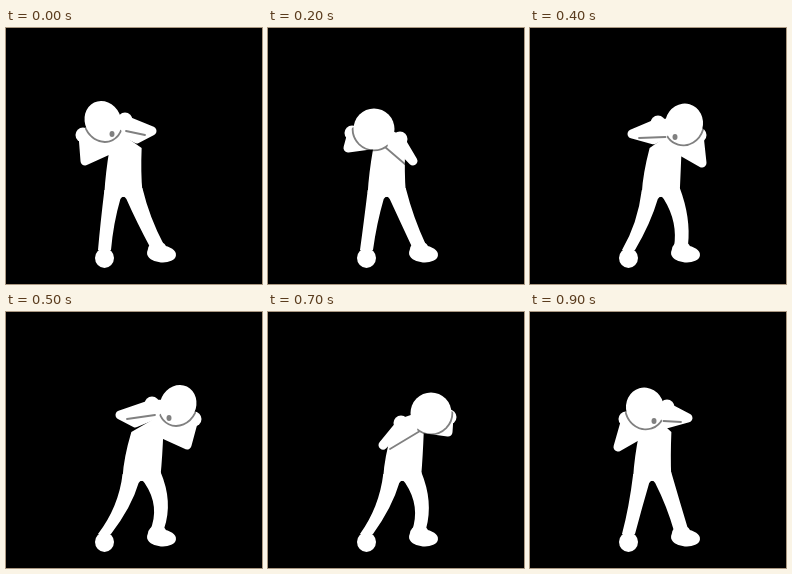
Recreate the animation shown at these times as an HTML page with a canvas. Size 256 by 256 pixels, loop 1000 ms.

```html
<!DOCTYPE html>
<html lang="en">
<head>
<meta charset="utf-8">
<title>Dancing figure</title>
<style>
  html, body { margin: 0; width: 100%; height: 100%; overflow: hidden; background: #000; }
  canvas { display: block; width: 100vw; height: 100vh; }
</style>
</head>
<body>
<canvas id="stage" width="256" height="256"></canvas>
<script>
const ctx = document.getElementById('stage').getContext('2d');
const STEP = 100;
const STEPS = 10;
const HALF = STEPS / 2;
const CENTRE = { head: 134.5, hand: 132.5, elbow: 130 };

const arm = (hand, elbow) => ({ hand, elbow });

// Key points of one half swing; the other half is its mirror image
const lean = { head: [97, 93], left: arm([77, 107], [79, 133]), right: arm([119, 92], [146, 103]) };
const duck = { head: [106, 101], left: arm([84, 105], [80, 120]), right: arm([132, 111], [145, 133]) };
const pass = { head: [120, 101], left: arm([96, 101], [84, 114]), right: arm([142, 113], [151, 137]) };
const rise = { head: [154, 96], left: arm([128, 95], [102, 106]), right: arm([169, 107], [172, 135]) };

function mid(a, b) {
  if (typeof a === 'number') return (a + b) / 2;
  if (Array.isArray(a)) return a.map((v, i) => mid(v, b[i]));
  return Object.fromEntries(Object.keys(a).map(k => [k, mid(a[k], b[k])]));
}

const swing = [lean, mid(lean, duck), duck, pass, rise];

const flip = ([x, y], axis) => [2 * axis - x, y];
const flipArm = a => arm(flip(a.hand, CENTRE.hand), flip(a.elbow, CENTRE.elbow));
const mirror = p => ({
  head: flip(p.head, CENTRE.head), left: flipArm(p.right), right: flipArm(p.left)
});

function poseAt(step) {
  const key = swing[step % HALF];
  const p = step < HALF ? key : mirror(key);
  const sway = -Math.cos((step / STEPS) * 2 * Math.PI - 0.52);
  const dir = p.head[0] < CENTRE.head ? 1 : -1; // side of the front arm
  const lift = (101 - p.head[1]) / 8;           // 0: face down, 1: head up
  return { ...p, dir, lift, chest: 129.5 + 12.5 * sway, hip: 126.5 + 10.5 * sway };
}

function oval(x, y, rx, ry, turn = 0, from = 0, to = 2 * Math.PI) {
  ctx.beginPath();
  ctx.ellipse(x, y, rx, ry, turn, from, to);
}

function blob(...shape) {
  oval(...shape);
  ctx.fill();
}

function drawLegs(hip) {
  const knee = 1.3 * hip - 22;
  ctx.beginPath();
  ctx.moveTo(hip - 19, 162);
  ctx.quadraticCurveTo(hip - 23, 195, 92, 222);
  ctx.lineTo(105, 222);
  ctx.quadraticCurveTo(hip - 10, 195, hip - 3, 171);
  ctx.quadraticCurveTo(hip, 166, hip + 3, 171);
  ctx.quadraticCurveTo(knee, 194, 144, 219);
  ctx.lineTo(158, 217);
  ctx.quadraticCurveTo(knee + 13, 190, hip + 19, 160);
  ctx.fill();
  blob(98.5, 230, 9.5, 10);
  blob(155.5, 226, 14.5, 8.5, 0.08);
  blob(151.5, 223, 10, 10);
}

function drawTorso({ head, chest, hip }) {
  ctx.beginPath();
  ctx.moveTo(hip - 19, 165);
  ctx.quadraticCurveTo(hip - 18, 146, chest - 15, 120);
  ctx.lineTo(...head);
  ctx.lineTo(chest + 17, 120);
  ctx.quadraticCurveTo(chest + 16, 145, hip + 19, 163);
  ctx.lineTo(hip, 169);
  ctx.fill();
}

// A raised elbow lifts the shoulder with it
function drawArm({ hand, elbow }, shoulder, head) {
  ctx.beginPath();
  ctx.moveTo(...hand);
  ctx.lineTo(...elbow);
  ctx.lineTo(shoulder, 80 + 0.3 * elbow[1]);
  ctx.lineTo(...head);
  ctx.closePath();
  ctx.lineWidth = 9;
  ctx.strokeStyle = '#fff';
  ctx.fill();
  ctx.stroke();
  blob(...hand, 7.5, 7.5);
}

// The grey contour shows only where head and front arm overlap the body
function drawHead({ head, left, right, dir, lift }) {
  const [x, y] = head;
  const shape = [x, y, 20.5 - 2.5 * lift, 20.5, -0.45 * dir * lift];
  const [ex, ey] = (dir > 0 ? right : left).elbow;

  ctx.globalCompositeOperation = 'source-atop';
  ctx.strokeStyle = '#808080';
  ctx.lineWidth = 3.6;
  oval(...shape, ...(dir > 0 ? [0.3 * Math.PI, Math.PI] : [0, 0.7 * Math.PI]));
  ctx.stroke();
  ctx.lineWidth = 1.8;
  ctx.beginPath();
  ctx.moveTo(ex - dir * 7, ey + 4);
  ctx.lineTo(x + dir * (11 + 12 * lift), y + 18 - 8 * lift);
  ctx.stroke();

  ctx.globalCompositeOperation = 'source-over';
  blob(...shape);
  if (lift > 0) {
    ctx.fillStyle = '#808080';
    blob(x + dir * 9, y + 13, 2.5, 3);
  }
}

function drawFigure(p) {
  ctx.clearRect(0, 0, 256, 256);
  ctx.fillStyle = '#fff';
  ctx.lineJoin = ctx.lineCap = 'round';
  drawLegs(p.hip);
  drawTorso(p);
  drawArm(p.left, p.chest - 11, p.head);
  drawArm(p.right, p.chest + 12, p.head);
  drawHead(p);
}

function tick(now) {
  drawFigure(poseAt(Math.floor(now / STEP) % STEPS));
  requestAnimationFrame(tick);
}
tick(performance.now());
</script>
</body>
</html>
```
